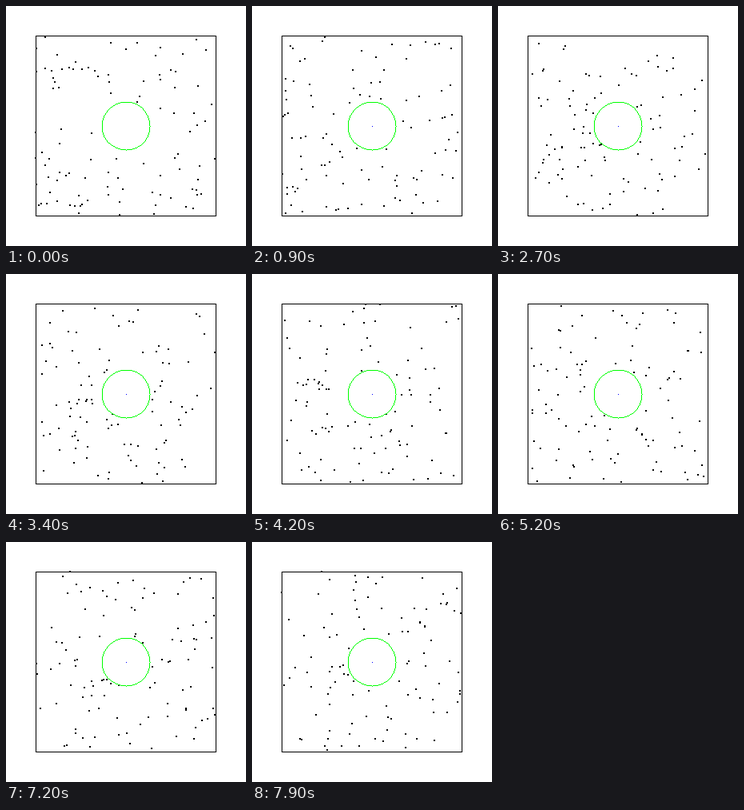
These frames come from a looping animation (300x300 px, 8000 ms). A matplotlib script:

```python
import numpy as np
import matplotlib.pyplot as plt
from matplotlib.animation import FuncAnimation

SIZE, FRAMES, INTERVAL = 300, 80, 100
LO, HI = 37, 262          # walls of the box
CENTER, RADIUS = 150, 30  # heavy disc in the middle
COUNT, SPEED = 100, 5.0

BLACK, GREEN, BLUE = (0, 0, 0), (0, 255, 0), (0, 0, 255)


def start_state(rng):
    """Uniform positions outside the disc, with random velocities."""
    pos = rng.uniform(LO, HI, (COUNT * 2, 2))
    outside = np.hypot(*(pos - CENTER).T) > RADIUS + 1
    return pos[outside][:COUNT], rng.uniform(-SPEED, SPEED, (COUNT, 2))


def step(pos, vel):
    """Move the particles once and bounce them off the walls and the disc."""
    pos, vel = pos + vel, vel.copy()
    low, high = pos < LO, pos > HI
    vel[low | high] *= -1
    pos = np.where(low, 2 * LO - pos, np.where(high, 2 * HI - pos, pos))

    offset = pos - CENTER
    dist = np.hypot(offset[:, 0], offset[:, 1])
    hit = dist < RADIUS
    normal = offset[hit] / dist[hit, None]
    inward = np.minimum((vel[hit] * normal).sum(axis=1), 0)
    vel[hit] -= 2 * inward[:, None] * normal
    pos[hit] = CENTER + normal * (2 * RADIUS - dist[hit, None])
    return pos, vel


def simulate():
    pos, vel = start_state(np.random.default_rng(12))
    track = [pos]
    for _ in range(FRAMES - 1):
        pos, vel = step(pos, vel)
        track.append(pos)
    return np.floor(track).astype(int)


def make_stage():
    stage = np.full((SIZE, SIZE, 3), 255, np.uint8)
    stage[[LO, HI], LO:HI + 1] = BLACK
    stage[LO:HI + 1, [LO, HI]] = BLACK
    return stage


def circle_pixels():
    """Thin outline with coordinates cut down to whole pixels."""
    reach = int(RADIUS / np.sqrt(2))
    a = np.arange(-reach, reach + 1)
    b = np.sqrt(RADIUS**2 - a**2)
    x, y = np.r_[a, a, b, -b], np.r_[b, -b, a, a]
    return tuple(np.floor(CENTER + v).astype(int) for v in (x, y))


TRACK = simulate()
STAGE = make_stage()
RING_X, RING_Y = circle_pixels()

fig = plt.figure(figsize=(3, 3), dpi=100)
ax = fig.add_axes([0, 0, 1, 1])
ax.axis("off")
picture = ax.imshow(STAGE, interpolation="nearest", aspect="auto")


def draw(i):
    img = STAGE.copy()
    x, y = TRACK[i].T
    for dx in (-1, 0):
        for dy in (-1, 0):
            img[y + dy, x + dx] = BLACK
    img[RING_Y, RING_X] = GREEN
    if i > 0:
        img[CENTER, CENTER] = BLUE  # trail of the disc
    picture.set_data(img)
    return [picture]


anim = FuncAnimation(fig, draw, frames=FRAMES, interval=INTERVAL,
                     repeat=True, repeat_delay=0, blit=False)
plt.show()
```
